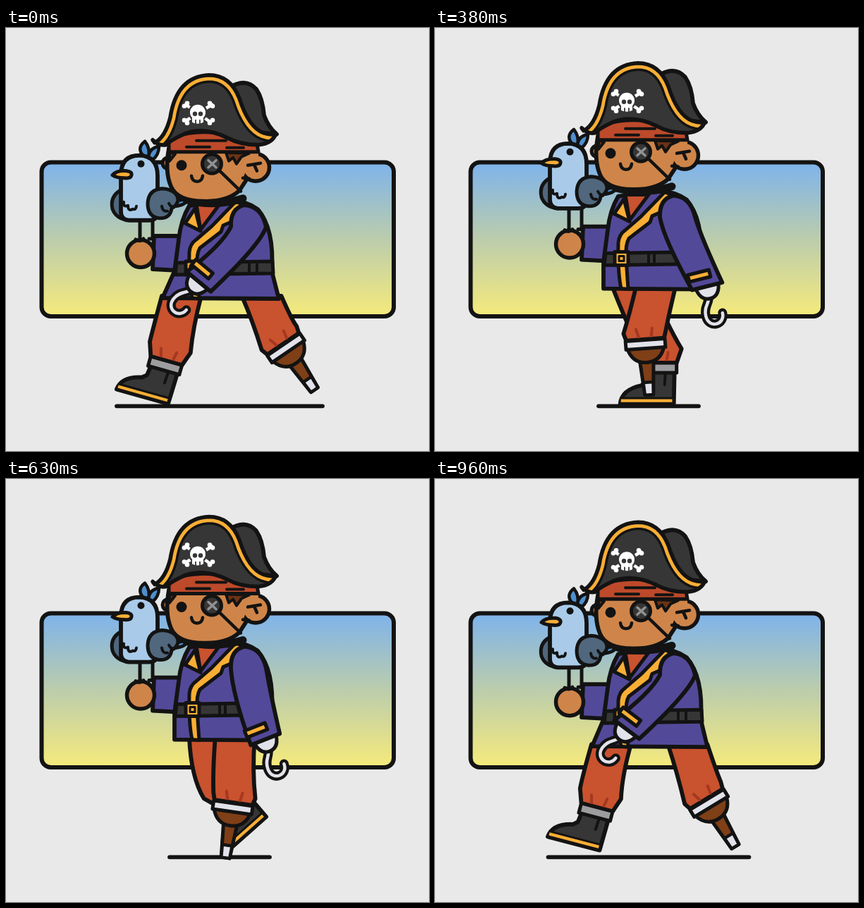
An HTML page with a canvas that plays this animation: 600x600 px, repeating every 1 s.

```html
<!DOCTYPE html>
<html lang="en">
<head>
<meta charset="utf-8">
<title>Walking pirate</title>
<style>
  html, body { margin: 0; height: 100%; overflow: hidden; background: #e9e9e9; }
  canvas { display: block; }
</style>
</head>
<body>
<canvas id="stage" width="600" height="600"></canvas>
<script>
const ctx = document.getElementById('stage').getContext('2d');
const STEPS = 24, HEM = 384;
const INK = '#131313', SKIN = '#cf8549', COAT = '#534999', CLOTH = '#c9522f',
      DARK = '#363636', GOLD = '#f9ae35', PALE = '#e2e3ea', WOOD = '#7f3f17';

// Motion rules; t counts steps of the walk, 0 to 24
const wave = (t, peak) => Math.cos(2 * Math.PI * (t - peak) / STEPS);
const crest = (t, peak, power) => Math.max(0, wave(t, peak)) ** power;
const since = (t, start) => (t - start + STEPS) % STEPS;
const bob = (t, height) => -height * Math.abs(Math.sin(Math.PI * t / 12)) ** 1.25;

// A foot is carried back evenly while planted, then eases forward again
function glide(t, plant, hold, x0, x1) {
  const p = since(t, plant);
  if (p < hold) return x0 + (x1 - x0) * p / hold;
  const u = (p - hold) / (STEPS - hold);
  return x1 + (x0 - x1) * (1 - Math.cos(Math.PI * u ** 1.12)) / 2;
}
function lift(t, start) {
  const u = since(t, start) / 14;
  return u < 1 ? Math.sin(Math.PI * u) : 0;
}

// Local point to path text, in a frame at (ox, oy) turned by deg
function frame(ox, oy, deg) {
  const c = Math.cos(deg * Math.PI / 180), s = Math.sin(deg * Math.PI / 180);
  return (x, y) => `${ox + x * c - y * s} ${oy + x * s + y * c} `;
}
const box = (p, x0, y0, x1, y1) =>
  `M${p(x0, y0)}L${p(x1, y0)}L${p(x1, y1)}L${p(x0, y1)}Z`;

function shape(d, fill, width = 5.8) {
  const path = new Path2D(d);
  ctx.fillStyle = fill;
  ctx.fill(path);
  if (width) line(path, width);
}
function line(d, width = 4.5, color = INK) {
  ctx.lineWidth = width;
  ctx.strokeStyle = color;
  ctx.stroke(new Path2D(d));
}
function disc(x, y, r, fill, width = 0) {
  ctx.beginPath();
  ctx.arc(x, y, r, 0, 7);
  ctx.fillStyle = fill;
  ctx.fill();
  if (width) { ctx.lineWidth = width; ctx.strokeStyle = INK; ctx.stroke(); }
}
function shifted(dy, draw) {
  ctx.save();
  ctx.translate(0, dy);
  draw();
  ctx.restore();
}

function backdrop() {
  ctx.fillStyle = '#e9e9e9';
  ctx.fillRect(0, 0, 600, 600);
  const g = ctx.createLinearGradient(0, 192, 0, 408);
  g.addColorStop(0, '#7fb3ea');
  g.addColorStop(.5, '#bccdac');
  g.addColorStop(1, '#f5ea7b');
  ctx.beginPath();
  ctx.roundRect(50.5, 190.5, 499.5, 218.5, 13);
  ctx.fillStyle = g;
  ctx.fill();
  ctx.lineWidth = 6;
  ctx.strokeStyle = INK;
  ctx.stroke();
}

function trouser(hipX, hipY, kx, ky, p, puff, drop, cuff) {
  const top = hipY - 4;
  shape(`M${hipX - 28} ${top}Q${kx - 28} ${ky} ${p(-puff, -drop)}L${p(-cuff, -7)}
    L${p(cuff, -7)}L${p(puff, -drop)}Q${kx + 28} ${ky} ${hipX + 28} ${top}Z`, CLOTH);
  line(`M${p(-9, -11)}L${p(-12, -22)}M${p(9, -11)}L${p(11, -22)}`, 4, '#a5381f');
}

function drawBootLeg(t, hipY) {
  const up = lift(t, 9.5), x = glide(t, 0, 12.5, 230, 381), y = 533 - 57 * up;
  const foot = frame(x, y, 21 * crest(t, 22, 2) - 44 * up);
  const p = (px, py) => foot(px - 19, py - 51);
  const [ax, ay] = p(0, 0).split(' ').map(Number);
  const hipX = 249 + .28 * (x - 230);
  shape(`M${p(-19, 5)}L${p(-21, 20)}L${p(-27, 25)}Q${p(-55, 31)}${p(-57, 51)}
    L${p(19, 51)}L${p(20, 5)}Z`, DARK);
  shape(box(p, -56, 44, 19, 51), GOLD, 0);
  line(`M${p(-56, 43)}L${p(19, 43)}`, 3);
  line(box(p, -57, 51, 19, 51) + `M${p(19, 51)}L${p(19, 40)}`, 4.5);
  line(`M${p(7, 8)}L${p(6, 24)}`, 4);
  trouser(hipX, hipY, (hipX + ax) / 2 - 15 * up, (hipY + ay) / 2 - 8 + 20 * up, p, 30, 27, 23);
  shape(box(p, -23, -7, 23, 7), '#9d9da0', 5);
}

function drawPegLeg(t, hipY) {
  const x = glide(t, 11, 13, 288, 397), y = 466 - 28 * lift(t, 22);
  const p = frame(x, y, 23 * wave(t, 13.5) - 13);
  const hipX = 314 + .5 * (x - 300);
  shape(`M${p(-10, 20)}L${p(10, 20)}L${p(6, 72)}L${p(-6, 72)}Z`, WOOD, 5);
  shape(`M${p(-7, 54)}L${p(7, 54)}L${p(6, 72)}L${p(-6, 72)}Z`, PALE, 4.5);
  shape(`M${p(-26, 5)}Q${p(-20, 26)}${p(0, 26)}Q${p(20, 26)}${p(26, 5)}Z`, WOOD, 5);
  trouser(hipX, hipY, (hipX + x) / 2 - 2, (hipY + y) / 2 - 4, p, 30, 17, 27);
  shape(box(p, -28, -6, 28, 6), PALE, 5);
}

function drawTorso(stride) {
  shape('M248 295L210 295L208 342L246 344Z', COAT);
  shape(`M260 252Q248 272 245 300L239 345L${239 - 17 * stride} 383L${374 + 13 * stride} 384
    L377 345Q381 285 357 257Q340 245 320 245Z`, COAT);
  shape('M270 250L303 250L276 286Z', CLOTH, 5);
  shape('M268 256L254 277L276 288Z', GOLD, 5);
  shape('M242 333L378 331L379 348L240 350Z', DARK, 5);
  line('M303 334V347M311 334V347M345 334V347M356 334V347', 4);
  shape(`M326 246L341 253Q336 268 322 274L308 280L305 289L275 312Q270 320 271 340
    L274 384L264 383Q259 360 260 318Q261 306 270 300L292 281Z`, GOLD, 5);
  shape('M255 331H274V350H255Z', GOLD, 5);
  shape('M261 337H268V344H261Z', GOLD, 3);
}

function drawHand() {
  disc(191, 320, 19.5, SKIN, 5.5);
  line('M184 300Q190 304 195 299M203 299L209 299', 5);
}

function drawNearArm(t) {
  const s = wave(t, -.8), ex = 343 - 10 * s, ey = 325 - 18 * s * s;
  const p = frame(334 - 62 * s, 382 - 9 * s - 14 * s * s, 6 + 34 * wave(t, .6));
  const hook = `M${p(-1, 14)}C${p(-3, 25)}${p(-12, 27)}${p(-12, 41)}
    C${p(-12, 60)}${p(12, 59)}${p(12, 42)}`;
  line(hook, 13);
  line(hook, 4.5, PALE);
  shape(`M${p(-17, -4)}Q${p(-15, 18)}${p(0, 18)}Q${p(15, 18)}${p(17, -4)}Z`, PALE, 5);
  shape(`M319 282Q318 256 338 251Q362 252 369 282Q${ex + 27} ${ey} ${p(22, 0)}
    L${p(-22, 0)}Q${ex - 27} ${ey} 319 282Z`, COAT);
  shape(box(p, -23, -22, 8, -12), GOLD, 5);
}

function drawBird() {
  shape('M238 238L262 231Q258 243 240 246ZM240 247L259 243Q254 254 238 254Z', '#4f8fce', 4.5);
  shape('M196 184Q184 172 197 162Q205 172 202 184ZM202 186Q202 172 217 169Q217 182 207 189Z',
    '#4f8fce', 4.5);
  shape('M163 231Q147 240 151 258Q156 272 174 274Z', '#50677d', 5);
  shape('M163 208Q164 182 189 182Q215 183 215 211V264Q214 274 203 274H174Q163 273 163 262Z',
    '#a9cbe9');
  line('M167 248Q166 256 173 253Q173 262 180 258Q184 260 185 254', 4);
  shape(`M201 250Q202 230 222 229Q244 231 244 246Q242 254 235 257Q233 272 217 271
    Q201 269 201 250Z`, '#50677d', 5);
  line('M221 254Q222 262 229 261M231 250Q234 257 241 254', 4);
  shape('M151 210Q157 203 171 204Q179 205 178 210Q177 215 168 214Q157 214 151 210Z', GOLD, 5);
  disc(191.5, 194, 5, INK);
}

function drawHead() {
  line('M256 245Q295 256 336 243', 11);
  disc(230, 193, 8, SKIN, 5);
  shape('M231 172Q225 205 234 226Q243 247 280 247Q314 248 331 232L344 212L355 172Z', SKIN);
  disc(354, 199, 19.5, SKIN, 5.5);
  shape('M316 172H358V186L345 192L336 215L320 210Z', SKIN, 0);
  shape('M232 177L240 180L232 190ZM312 178L316 190L322 185L327 194L334 184L345 179Z', '#6d3215', 4);
  line('M343 196L361 193M352 195L356 204M336 214L345 215', 4.5);
  line('M300 201L333 233', 4.5);
  disc(249, 196, 7.5, INK);
  line('M263 211Q264 219 271 219Q278 219 279 211', 4.5);
  disc(292, 194, 13.5, DARK, 5);
  line('M287 189L298 199M298 189L287 199', 3.5, '#929292');
  shape('M231 177V160Q270 138 355 160L358 177Z', '#bd4a2a', 5);
  line('M256 170H289M270 161H312M313 171H337', 4);
}

function drawSkull() {
  line('M255 110L289 134M292 110L255 133', 4.5, '#fff');
  for (const sx of [-1, 1]) for (const sy of [-1, 1]) {
    const x = 273 + 18 * sx, y = 122 + 12 * sy;
    disc(x - 2, y + 2 * sx * sy, 3.3, '#fff');
    disc(x + 2, y - 2 * sx * sy, 3.3, '#fff');
  }
  disc(272, 121, 13.5, DARK);
  disc(272, 121, 11, '#fff');
  shape('M264 127H280V135Q272 139 264 135Z', '#fff', 0);
  for (const x of [268, 276]) disc(x, 123, 3.2, DARK);
  line('M269 132V137M275 132V137', 1.8, DARK);
}

function drawHat() {
  shape('M316 86Q340 71 355 88Q364 101 366 125Q372 142 384 152L345 148Z', DARK);
  const rim = `M211 164Q226 156 233 128Q242 70 288 68Q318 68 331 101Q344 142 365 150
    Q376 154 383 151`;
  const all = new Path2D(rim + `Q378 165 358 167Q332 167 314 157Q282 141 254 151
    Q234 160 227 167Q217 169 208 160L211 164Z`);
  ctx.fillStyle = DARK;
  ctx.fill(all);
  ctx.save();
  ctx.clip(all);
  line(rim, 22);
  line(rim, 15, GOLD);
  ctx.restore();
  line(all, 5.5);
  drawSkull();
}

function draw(t) {
  const body = bob(t, 20.7), head = bob(t - .35, 25.3), stride = crest(t, 0, 1.4);
  const reach = 71 + 75 * stride;
  ctx.lineJoin = 'round';
  ctx.lineCap = 'round';
  backdrop();
  line(`M${303 - reach} 536.3H${303 + reach}`, 5.8);
  drawBootLeg(t, HEM + body);
  drawPegLeg(t, HEM + body);
  shifted(body, () => drawTorso(stride));
  line(`M190 ${272 + head}V${300 + body}M208 ${272 + head}V${298 + body}`, 5);
  shifted(body, drawHand);
  shifted(head, drawBird);
  shifted(body, () => drawNearArm(t));
  shifted(head, () => { drawHead(); drawHat(); });
}

function tick() {
  const ms = performance.now() % 1000;
  draw(Math.floor((ms + 3) * STEPS / 1000) % STEPS);
  requestAnimationFrame(tick);
}
tick();
</script>
</body>
</html>
```
